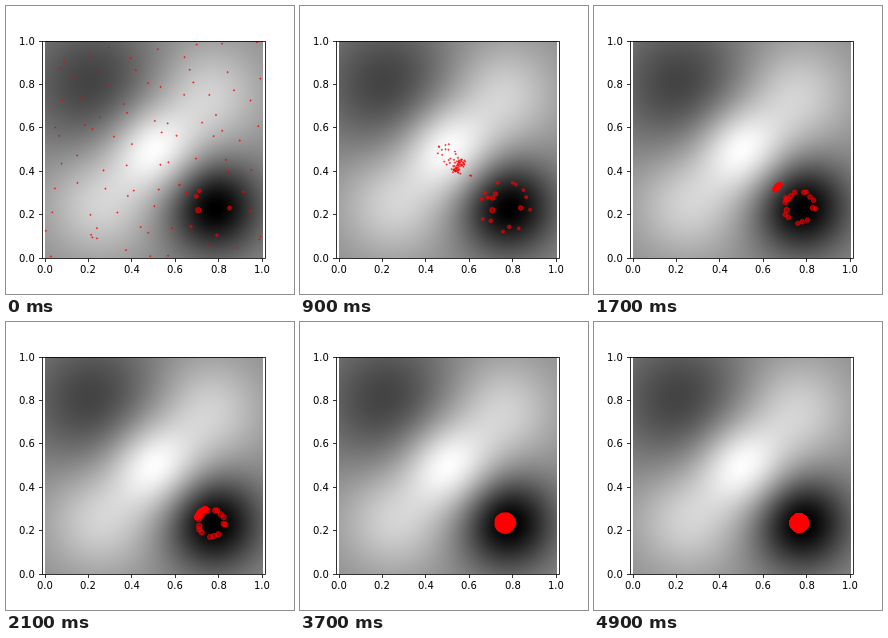
An HTML page with a canvas that plays this animation: 288 px wide and 288 px high, repeating every 5000 ms.

```html
<!DOCTYPE html>
<html lang="en">
<head>
<meta charset="utf-8">
<title>Swarm search</title>
<style>
  html, body { margin: 0; width: 100%; height: 100%; overflow: hidden; background: #fff; }
  canvas { position: absolute; left: 39px; top: 35px; }
  svg { position: absolute; left: 0; top: 0; }
  text { font: 10px "DejaVu Sans", sans-serif; }
  #axes { fill: none; stroke: #000; stroke-width: .8; }
  #dots { fill: red; stroke: red; fill-opacity: .58; stroke-opacity: .58; }
</style>
</head>
<body>
<canvas id="field" width="218" height="217"></canvas>
<svg width="288" height="288" viewBox="0 0 288 288">
  <g id="dots"></g>
  <g id="axes"><rect x="36.5" y="35.5" width="223" height="217"/></g>
  <g id="labels"></g>
</svg>
<script>
const STEP = 100, STEPS = 50;
const LEFT = 39, BOTTOM = 252.4, SIZE = 217.4;
const GOAL = { x: 205.2, y: 201 };
const COLS = 9, ROWS = 10, BASIN = 55;
const byId = id => document.getElementById(id);
const clamp = (v, lo = 0, hi = 1) => Math.min(hi, Math.max(lo, v));
const mix = (a, b, t) => a + (b - a) * t;
const ramp = (n, from, to) => clamp((n - from) / (to - from));

let seed = 20;
function random() {
  seed = (seed * 1664525 + 1013904223) % 4294967296;
  return seed / 4294967296;
}

function add(parent, tag, attrs, text) {
  const el = document.createElementNS("http://www.w3.org/2000/svg", tag);
  for (const key in attrs) el.setAttribute(key, attrs[key]);
  if (text) el.textContent = text;
  return byId(parent).appendChild(el);
}

// Landscape: two hills, a peak between them, a shallow and a deep basin
const bump = (dx, dy, height, width) =>
  height * Math.exp(-(dx * dx + dy * dy) / (2 * width * width));

function grey(x, y) {
  return 140
    + bump(x - .25, y - .25, 70, .175) + bump(x - .75, y - .75, 70, .175)
    + bump(x - .5, y - .5, 113, .145)
    + bump(x - .22, y - .8, -75, .22) + bump(x - .775, y - .235, -146, .15);
}

function drawField() {
  const canvas = byId("field"), ctx = canvas.getContext("2d");
  const { width, height } = canvas;
  const image = ctx.createImageData(width, height);
  for (let y = 0, k = 0; y < height; y++) {
    for (let x = 0; x < width; x++, k += 4) {
      const g = grey((x + .5) / width, 1 - (y + .5) / height);
      image.data.set([g, g, g, 255], k);
    }
  }
  ctx.putImageData(image, 0, 0);
}

function drawAxes() {
  for (let i = 0; i <= 5; i++) {
    const label = (i / 5).toFixed(1);
    const x = LEFT + SIZE * i / 5;
    const px = Math.floor(x) + .5, py = Math.floor(BOTTOM - SIZE * i / 5) + .5;
    add("axes", "path", { d: `M${px} 252.5v3.5M36.5 ${py}h-3.5` });
    add("labels", "text", { x: Math.round(x - 8), y: 267 }, label);
    add("labels", "text", { x: 13, y: py + 3.7 }, label);
  }
}

const ringAt = n => 13.3 / (1 + (n / 34) ** 5);
const around = (r, a) => ({ x: GOAL.x + r * Math.cos(a), y: GOAL.y + r * Math.sin(a) });

// Agents on bright ground are drawn faster to the crowd, then all ring the goal
function roamer(u, v) {
  const x = LEFT + SIZE * u, y = BOTTOM - SIZE * v;
  const speed = 1 + .8 * clamp((grey(u, v) - 85) / 70);
  const side = 2 * random() - 1, depth = random();
  const jx = 6 * random() - 3, jy = 6 * random() - 3;
  return n => {
    const drift = ramp(n, 5, 13), join = ramp(n, 13, 22);
    const keep = Math.exp(-speed * (.1 * n + .009 * n * n));
    const crowdX = mix(145, 172.5, drift), crowdY = mix(150, 172, drift);
    const angle = -.75 * Math.PI + side * mix(.65, 1.9, ramp(n, 21, 29));
    const end = around(ringAt(n) * (1 - depth * ramp(n, 30, 37)), angle);
    return {
      x: mix(crowdX + (x - crowdX) * keep + jx * drift, end.x, join),
      y: mix(crowdY + (y - crowdY) * keep + jy * drift, end.y, join)
    };
  };
}

// Agents that start in the deep basin slide straight onto the ring
function settler(start, angle) {
  const speed = 1 + Math.max(0, start - 40) / 25;
  return n => around(ringAt(n) + (start - 13) * Math.exp(-speed * (n / 10.5) ** 1.4), angle);
}

function makeAgents() {
  const agents = [settler(13, 2.9)];
  for (let i = 0; i < COLS * ROWS; i++) {
    const u = (i % COLS + random()) / COLS, v = (Math.floor(i / COLS) + random()) / ROWS;
    const dx = LEFT + SIZE * u - GOAL.x, dy = BOTTOM - SIZE * v - GOAL.y;
    const dist = Math.hypot(dx, dy);
    agents.push(dist < BASIN ? settler(Math.max(18, dist), Math.atan2(dy, dx)) : roamer(u, v));
  }
  return agents.map(place => ({ place, el: add("dots", "circle", {}) }));
}

// Markers grow as they near the goal
const radius = dist => .65 + .7 * Math.exp(-((dist / 36) ** 4)) + 8 * Math.exp(-dist / 7.5);

drawField();
drawAxes();
const agents = makeAgents();

function render(time) {
  const n = Math.floor(time / STEP) % STEPS;
  for (const { place, el } of agents) {
    const { x, y } = place(n);
    el.setAttribute("cx", x.toFixed(2));
    el.setAttribute("cy", y.toFixed(2));
    el.setAttribute("r", radius(Math.hypot(x - GOAL.x, y - GOAL.y)).toFixed(2));
  }
}

const began = performance.now();
function tick() {
  render(performance.now() - began);
  requestAnimationFrame(tick);
}
tick();
</script>
</body>
</html>
```
